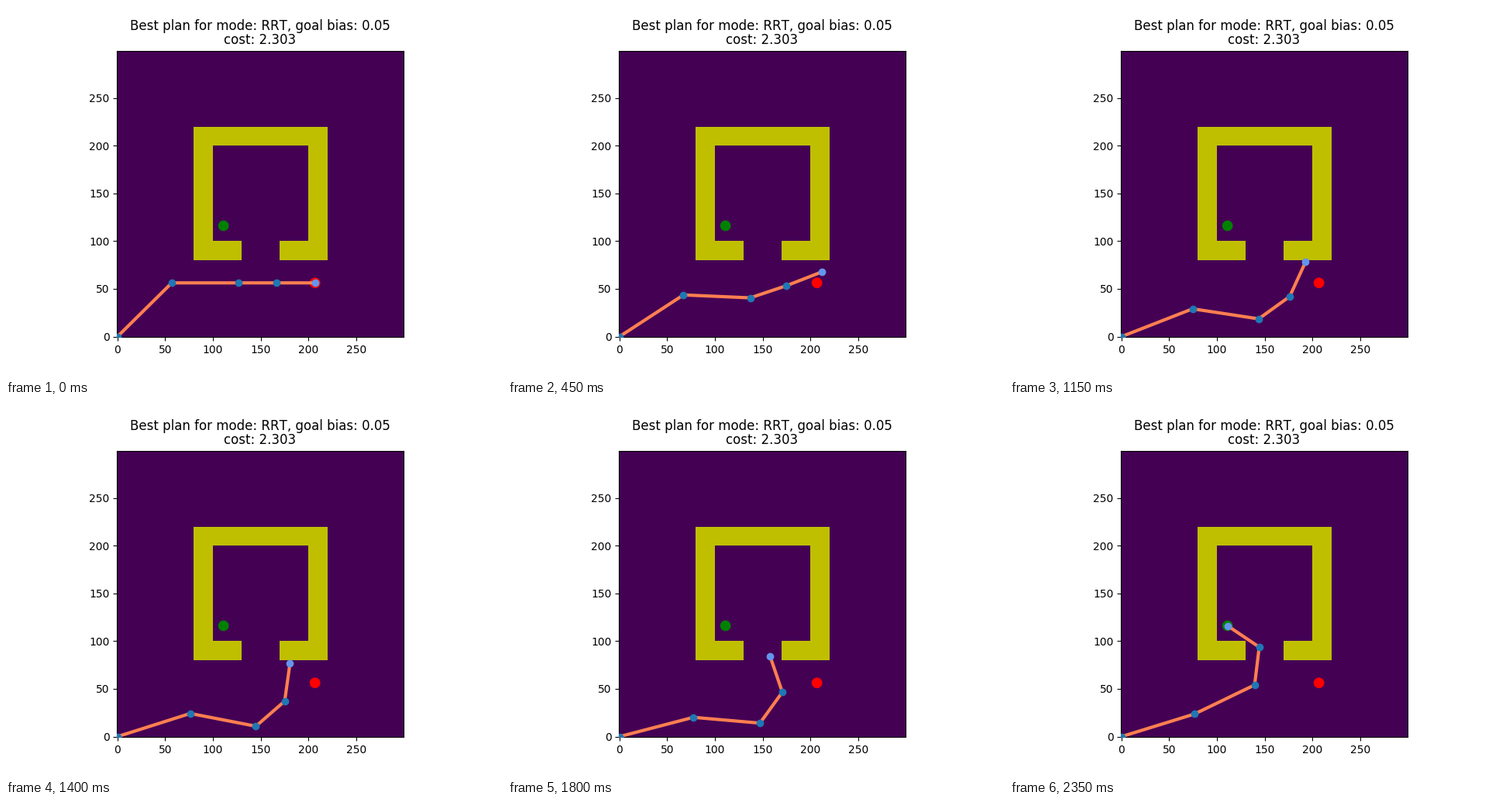
These frames come from a looping animation (640 by 480 pixels, 2400 ms). A matplotlib script:

```python
import numpy as np
import matplotlib.pyplot as plt
from matplotlib.animation import FuncAnimation
from matplotlib.patches import Circle, Rectangle

FRAMES, INTERVAL = 48, 50
LINKS = np.array([80, 70, 40, 40])

# Joint angles (radians) at the corners of the plan, and when each is reached
KEY_TIMES = [0, 11.5, 33, FRAMES - 1]
KEY_ANGLES = np.array([
    [0.78, -0.78, 0.0, 0.0],
    [0.521, -0.577, 0.470, 0.060],
    [0.243, -0.476, 1.040, 0.915],
    [0.30, 0.15, 1.0, 1.1],
])

# Letter spacing rounded to whole pixels
plt.rcParams["text.kerning_factor"] = 6


def arm_points(frame):
    """Positions of the base, the joints and the tip."""
    angles = [np.interp(frame, KEY_TIMES, column) for column in KEY_ANGLES.T]
    heading = np.cumsum(angles)
    steps = LINKS[:, None] * np.column_stack([np.cos(heading), np.sin(heading)])
    return np.vstack([[0, 0], np.cumsum(steps, axis=0)])


def add_box(x, y, width, height, color):
    ax.add_patch(Rectangle((x, y), width, height, fc=color, lw=0))


fig, ax = plt.subplots(figsize=(6.4, 4.8), dpi=100)
floor = plt.get_cmap("viridis")(0)
ax.set_aspect("equal")
ax.set_xlim(-0.5, 299.5)
ax.set_ylim(-0.5, 299.5)
ax.set_xticks(range(0, 300, 50))
ax.set_yticks(range(0, 300, 50))
ax.set_facecolor(floor)
ax.set_title("Best plan for mode: RRT, goal bias: 0.05\ncost: 2.303",
             linespacing=1.0)

# Walled room with a doorway at the bottom
add_box(80, 80, 140, 140, "y")
add_box(100, 100, 100, 100, floor)
add_box(130, 80, 40, 20, floor)

for frame, color in [(0, "red"), (FRAMES - 1, "green")]:
    ax.add_patch(Circle(arm_points(frame)[-1], 5, color=color, lw=1))

line, = ax.plot([], [], color="coral", lw=3, zorder=3)
joints = ax.scatter([0], [0], color="tab:blue", zorder=4)
tip = ax.scatter([0], [0], color="cornflowerblue", zorder=5)


def update(frame):
    points = arm_points(frame)
    line.set_data(points[:, 0], points[:, 1])
    joints.set_offsets(points[:-1])
    tip.set_offsets(points[-1:])
    return line, joints, tip


anim = FuncAnimation(fig, update, frames=FRAMES, interval=INTERVAL, repeat=True)
plt.show()
```
